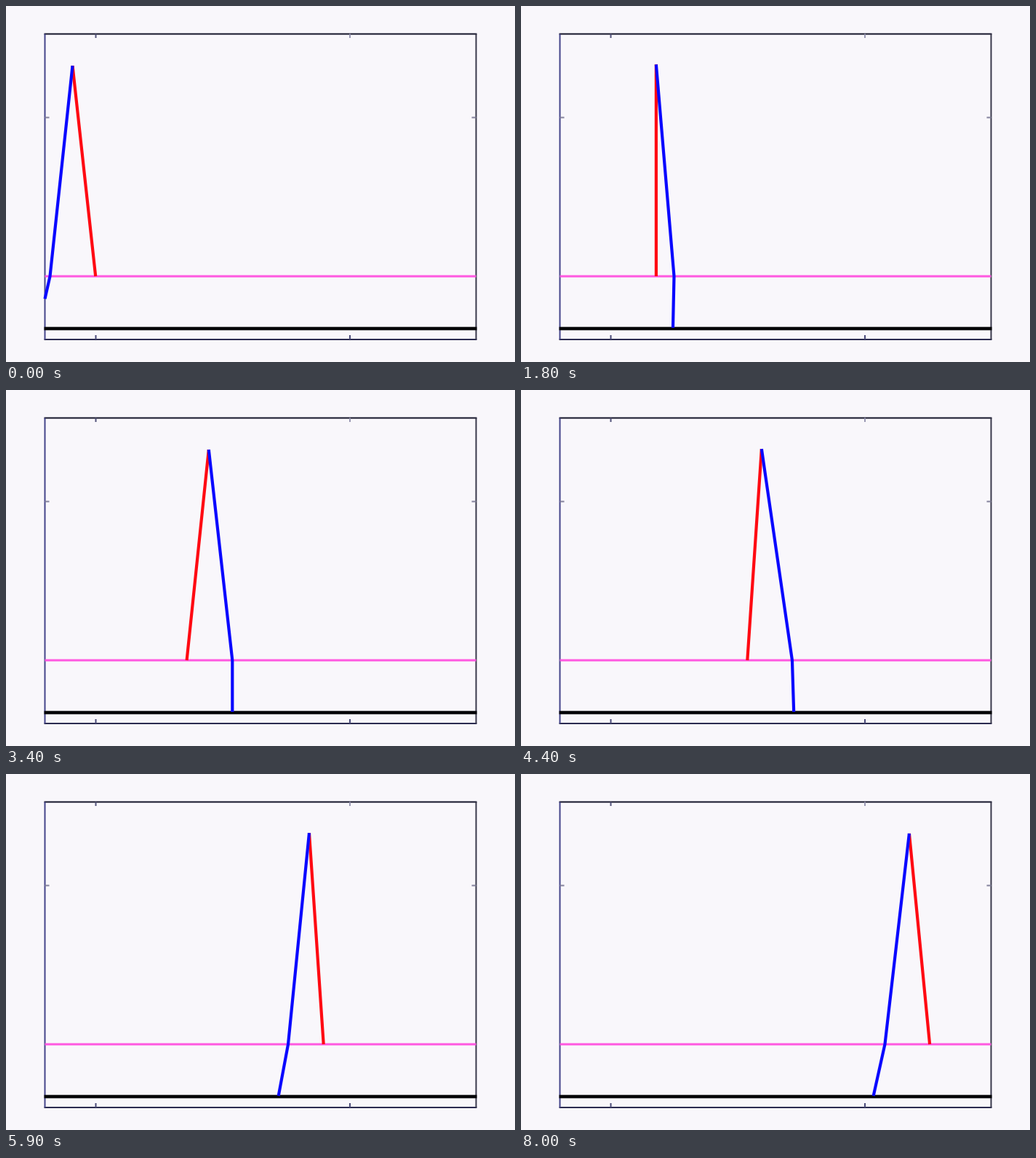
Recreate the animation shown at these times as a matplotlib script. Size 700x490 px, loop 8100 ms.

```python
import math

import matplotlib.pyplot as plt
from matplotlib.animation import FuncAnimation

W, H, DPI = 700, 490, 100
FRAMES, INTERVAL = 81, 100
LEFT, RIGHT, TOP, BOTTOM = 53.5, 646.5, 38.5, 459
GROUND, FLOOR = 372, 443
FIRST_FOOT, STRIDE = 123.2, 62.7
PERIOD = 11.34        # frames per step
SWING = 10.6          # frames the knee needs to reach the next foothold
LEG = 291.5

fig = plt.figure(figsize=(W / DPI, H / DPI), dpi=DPI, facecolor="#f9f7fb")
ax = fig.add_axes([0, 0, 1, 1])
ax.set_xlim(0, W)
ax.set_ylim(H, 0)
ax.axis("off")


def stroke(xs, ys, color, width, z=1):
    line, = ax.plot(xs, ys, color=color, lw=width * 72 / DPI, zorder=z,
                    solid_capstyle="butt", solid_joinstyle="round", snap=False)
    return line


# Plot box with inward ticks
stroke([LEFT - 1, RIGHT + 1], [TOP, TOP], "#15152a", 2)
stroke([LEFT - 1, RIGHT + 1], [BOTTOM, BOTTOM], "#2c2c50", 2)
stroke([LEFT, LEFT], [TOP, BOTTOM], "#45458a", 2)
stroke([RIGHT, RIGHT], [TOP, BOTTOM], "#3a3a4c", 2)
for x, color in ((123.5, "#55557c"), (473, "#9a98b4")):
    stroke([x, x], [TOP, TOP + 5.5], color, 2)
    stroke([x, x], [BOTTOM - 6, BOTTOM], "#4a4a78", 2)
stroke([LEFT, LEFT + 6], [153.5, 153.5], "#85839c", 2)
stroke([RIGHT - 6, RIGHT], [153.5, 153.5], "#85839c", 2)

stroke([LEFT, RIGHT], [GROUND, GROUND], "#ff58e0", 3, 2)
stroke([LEFT - 1, RIGHT + 1], [444, 444], "#060608", 4.6, 2)
stance = stroke([], [], "#ff0a12", 4.2, 3)
swing = stroke([], [], "#0a08ff", 4.2, 4)


def pose(frame):
    """Stance foot, then hip, knee and swing foot offsets from it."""
    step = math.floor(frame / PERIOD)
    p = frame - step * PERIOD
    u = p - 4.2
    hip = -11.22 + 4.37 * u + 0.0286 * u ** 3
    knee = -STRIDE * math.cos(math.pi * min(p / SWING, 1))
    shin = -16 + 0.614 * p ** 2 - 0.0432 * p ** 3
    return FIRST_FOOT + STRIDE * step, hip, knee, knee + shin


def draw(frame):
    foot, hip, knee, toe = pose(frame)
    hip_y = GROUND - math.sqrt(LEG ** 2 - hip ** 2)
    hip_x, knee_x, toe_x, toe_y = foot + hip, foot + knee, foot + toe, FLOOR
    if toe_x < LEFT:  # cut the shin at the edge of the box
        toe_y = GROUND + (FLOOR - GROUND) * (knee_x - LEFT) / (knee_x - toe_x)
        toe_x = LEFT
    stance.set_data([foot, hip_x], [GROUND, hip_y])
    swing.set_data([hip_x, knee_x, toe_x], [hip_y, GROUND, toe_y])
    return stance, swing


anim = FuncAnimation(fig, draw, frames=FRAMES, interval=INTERVAL,
                     repeat=True, repeat_delay=0)
plt.show()
```
